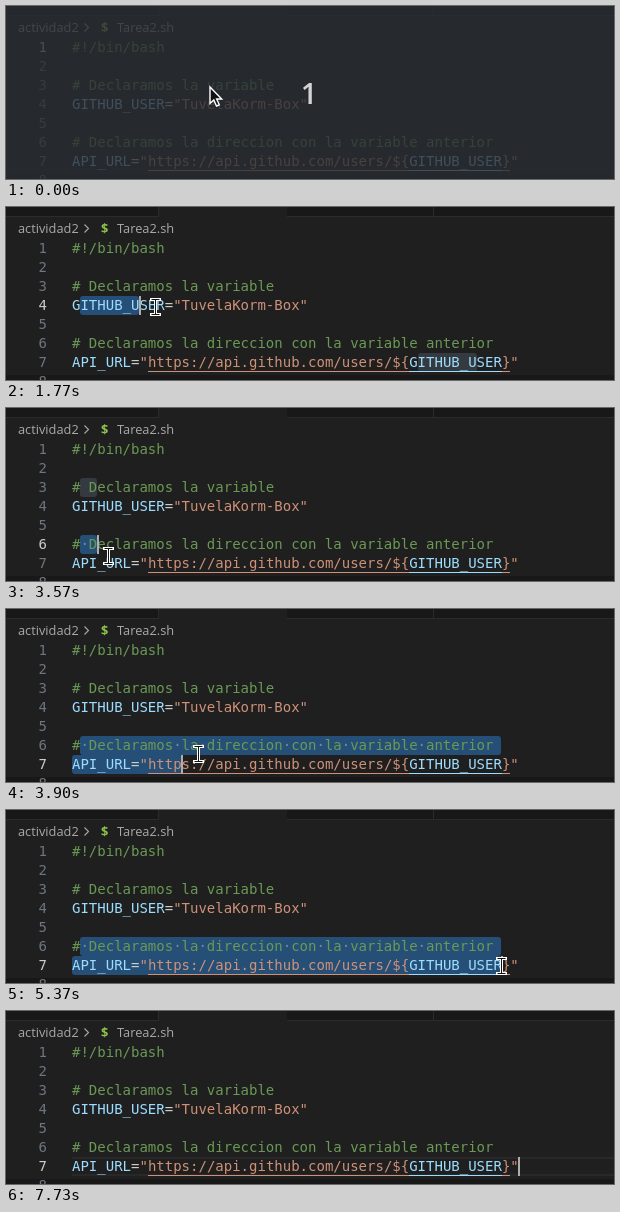
Animation of 608x173 px, one loop 7.91 s. Source, as an HTML page:

```html
<!DOCTYPE html>
<html lang="es">
<head>
<meta charset="utf-8">
<title>Editor</title>
<style>
html, body { margin: 0; width: 100%; height: 100%; overflow: hidden; background: #1f1f1f; }
#stage { position: absolute; left: 0; top: 0; width: 608px; height: 173px; overflow: hidden; background: #1f1f1f; }
#stage div, #stage svg { position: absolute; }
.tab { top: 0; height: 9px; background: #181818; border: solid #2b2b2b; border-width: 0 1px 1px 0; }
#edge { left: 0; top: 168px; width: 608px; height: 5px; background: #181818; }
#current { left: 66px; width: 542px; height: 19px; box-sizing: border-box; border: solid #282828; border-width: 2px 0; }
.crumb { top: 12px; font: 12.8px/19px "Open Sans", "Noto Sans", sans-serif; color: #a9a9a9; white-space: pre; }
.crumb.hover { color: #e0e0e0; }
.row, .number, .dots { font: 14px/19px "DejaVu Sans Mono", monospace; white-space: pre; }
.row { left: 66px; height: 19px; color: #ccc; }
.number { left: 21px; width: 20px; text-align: right; color: #6e7681; }
.number.active { color: #ccc; }
.comment { color: #6a9955; }
.variable { color: #9cdcfe; }
.string { color: #ce9178; }
.link { padding-bottom: 1px; border-bottom: 1px solid currentColor; }
.box { height: 19px; border-radius: 3px; overflow: hidden; }
.selected { background: #264f78; }
.match { background: #add6ff26; }
.word { background: #575757b8; border-radius: 0; }
.dots { color: #e3e4e266; }
#caret { width: 2px; height: 19px; background: #aeafad; }
#veil { inset: 0; background: rgba(40, 44, 51, .8); }
#count { left: 283px; top: 66px; width: 40px; text-align: center; color: #d3d3d3; font: 600 29px/42px "Open Sans", "Noto Sans", sans-serif; }
svg { left: 0; top: 0; overflow: visible; }
</style>
</head>
<body>
<div id="stage">
  <div class="tab" style="left:0;width:152px"></div>
  <div class="tab" style="left:281px;width:146px"></div>
  <div class="tab" style="left:428px;width:180px"></div>
  <div id="edge"></div>
  <div class="crumb" id="folder" style="left:12px">actividad2</div>
  <svg width="608" height="32"><path d="M78.5 17.5l4 4-4 4" fill="none" stroke="#a9a9a9" stroke-width="1.1"/></svg>
  <div class="crumb" style="left:95px;color:#8dc149;font-weight:700">$</div>
  <div class="crumb" style="left:111px">Tarea2.sh</div>
  <div id="current"></div>
  <div id="marks"></div>
  <div id="code"></div>
  <div id="caret"></div>
  <div id="veil"></div>
  <div id="count">1</div>
  <svg id="pointer" width="1" height="1">
    <path id="arrow" d="M0 0V16.5L3.8 13L6.5 19L9.3 17.8L6.6 12H11.7Z" fill="#111" stroke="#fff" stroke-width="1.4"/>
    <g id="beam" transform="translate(.5 0)">
      <path id="stem" d="M-4-7.5H4M0-7.5V7.5M-4 7.5H4" stroke="#fff" stroke-width="3" stroke-linecap="square"/>
      <path d="M-4-7.5H4M0-7.5V7.5M-4 7.5H4" stroke="#111"/>
    </g>
  </svg>
</div>
<script>
const LOOP = 7910, LEFT = 66, TOP = 32, CHAR = 8.428, ROW = 19, LAG = 46;
const DRAG_NAME = 1570, CLICK_NAME = 2600, DRAG_URL = 3470, CLICK_END = 5700;
const $ = id => document.getElementById(id);

// Each line is a list of [class, text] pieces.
const lines = [
  [["comment", "#!/bin/bash"]],
  [],
  [["comment", "# Declaramos la variable"]],
  [["variable", "GITHUB_USER"], ["", "="], ["string", '"TuvelaKorm-Box"']],
  [],
  [["comment", "# Declaramos la direccion con la variable anterior"]],
  [["variable", "API_URL"], ["", "="], ["string", '"'], ["string link", "https://api.github.com/users/${"],
   ["variable link", "GITHUB_USER"], ["string link", "}"], ["string", '"']],
  []
];
const texts = lines.map(pieces => pieces.map(p => p[1]).join(""));

function add(parent, className, x, y, text = "") {
  const el = document.createElement("div");
  el.className = className;
  if (x !== null) el.style.left = x + "px";
  el.style.top = y + "px";
  el.textContent = text;
  parent.append(el);
  return el;
}

const numbers = lines.map((pieces, i) => {
  const y = TOP + i * ROW, row = add($("code"), "row", null, y);
  for (const [className, text] of pieces) {
    const span = document.createElement("span");
    span.className = className;
    span.textContent = text;
    row.append(span);
  }
  return add($("code"), "number", null, y, i + 1);
});

// Mouse moves start at a given time; their length follows from the way to go.
const moves = [];
let spot = { x: 204, y: 81 };
function move(start, x, y, sag = 0) {
  const duration = 100 + 2 * Math.hypot(x - spot.x, y - spot.y) + 13 * sag;
  moves.push({ start, duration, from: spot, to: { x, y }, sag });
  spot = { x, y };
}
move(400, 63, 109);
move(1070, 73, 100);
move(DRAG_NAME, 226, 100);
move(2170, 210, 106, 4);
move(2970, 74, 142);
move(DRAG_URL, 208, 141, 9.5);
move(4230, 250, 154);
move(4630, 495, 156);
move(5370, 514, 157);
move(5970, 355, 125, 6);
move(6700, 263, 101);
move(7130, 45, -25);

function mouseAt(t) {
  const { start, duration, from, to, sag } = moves.findLast(m => m.start <= t) || moves[0];
  const k = Math.max(0, Math.min(1, (t - start) / duration));
  return [from.x + (to.x - from.x) * k, from.y + (to.y - from.y) * k + sag * Math.sin(Math.PI * k)];
}

function placeAt(t) {
  const [x, y] = mouseAt(t);
  const line = Math.floor((y - TOP) / ROW);
  const col = Math.max(0, Math.min(texts[line].length, Math.round((x - LEFT) / CHAR)));
  return { line, col };
}

function dragState(start, t) {
  return { anchor: placeAt(start), caret: placeAt(Math.max(start, t - LAG)) };
}

function editorAt(t) {
  if (t < DRAG_NAME) return { caret: { line: 0, col: 0 }, idle: true };
  if (t < CLICK_NAME) return dragState(DRAG_NAME, t);
  if (t < DRAG_URL) return { caret: { line: 3, col: 18 }, click: CLICK_NAME };
  if (t < CLICK_END) return dragState(DRAG_URL, t);
  return { caret: { line: 6, col: texts[6].length }, click: CLICK_END };
}

function mark(className, line, from, to, extra = 0) {
  if (to <= from && !extra) return;
  const el = add($("marks"), "box " + className, LEFT + from * CHAR, TOP + line * ROW);
  el.style.width = (to - from) * CHAR + extra + "px";
  if (className === "selected") {
    add(el, "dots", -from * CHAR, 0, texts[line].replace(/[^ ]/g, "\u00a0").replace(/ /g, "·"));
  }
}

function drawSelection(anchor, caret) {
  if (anchor.line !== caret.line) {
    mark("selected", anchor.line, anchor.col, texts[anchor.line].length, 8);
    mark("selected", caret.line, 0, caret.col);
    return;
  }
  const from = Math.min(anchor.col, caret.col), to = Math.max(anchor.col, caret.col);
  mark("selected", caret.line, from, to);
  const part = texts[caret.line].slice(from, to);
  if (part.length < 2) return;
  texts.forEach((text, i) => {
    const at = text.indexOf(part);
    if (i !== caret.line && at >= 0) mark("match", i, at, at + part.length);
  });
}

function draw(t) {
  const { caret, anchor, click, idle } = editorAt(t);
  const lineTop = TOP + caret.line * ROW + "px";
  $("marks").replaceChildren();
  if (anchor) drawSelection(anchor, caret);
  if (click === CLICK_NAME && t >= click + 200) mark("word", 3, 13, 23);
  numbers.forEach((el, i) => el.classList.toggle("active", i === caret.line));
  $("current").style.display = click ? "" : "none";
  $("current").style.top = lineTop;

  const blinkOff = click && (t - click) % 1000 >= 500;
  $("caret").style.visibility = idle || blinkOff ? "hidden" : "visible";
  $("caret").style.left = Math.floor(LEFT + caret.col * CHAR) + "px";
  $("caret").style.top = lineTop;

  $("veil").style.opacity = $("count").style.opacity = Math.max(0, Math.min(1, (400 - t) / 370));

  const [x, y] = mouseAt(t).map(Math.round);
  const useArrow = t < 400 || y < TOP;
  $("pointer").style.transform = `translate(${x}px, ${y}px)`;
  $("arrow").style.display = useArrow ? "" : "none";
  $("beam").style.display = useArrow ? "none" : "";
  $("folder").classList.toggle("hover", y > 11 && y < TOP && x > 12 && x < 76);
}

const start = performance.now();
function tick() {
  draw((performance.now() - start) % LOOP);
  requestAnimationFrame(tick);
}
tick();
</script>
</body>
</html>
```
